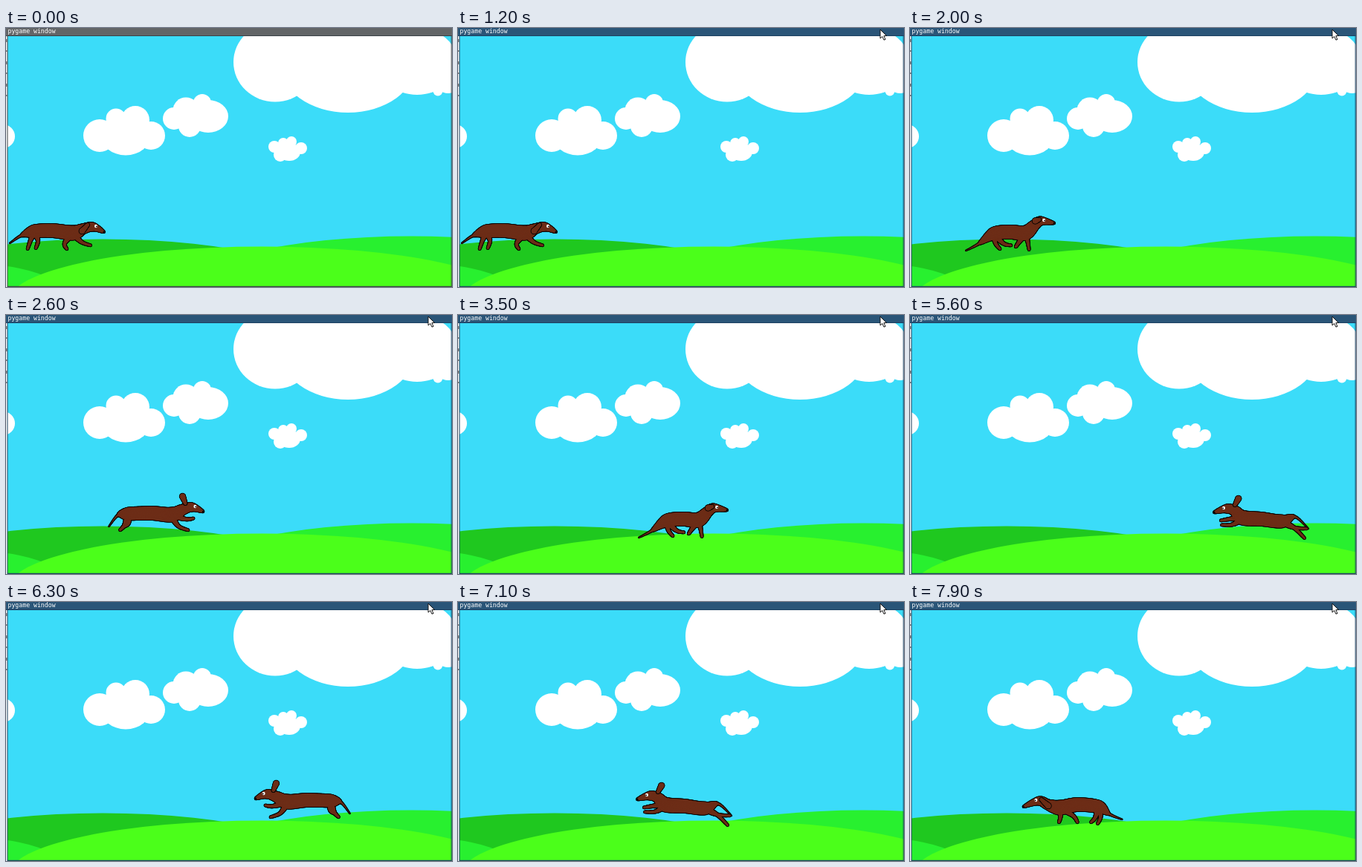
An HTML page with a canvas for the animation above (8 s loop, 600 px wide and 349 px high).

```html
<!DOCTYPE html>
<html lang="en">
<head>
<meta charset="utf-8">
<title>Running dog</title>
<style>
html, body { margin: 0; width: 100%; height: 100%; overflow: hidden; background: #fff; }
canvas { display: block; }
</style>
</head>
<body>
<canvas id="stage" width="600" height="349"></canvas>
<script>
const ctx = document.getElementById('stage').getContext('2d');
const LOOP = 8000, TICK = 100, STEP = 11.2;
const START = 14, TURN = 54;   // ticks: last still one, first one heading back
const FUR = '#6d2d17', INK = '#0c0705';

// Thickness along the body from tail tip to nose, along a leg and along an ear.
const BODY = [0.7, 1.8, 9, 9.5, 10, 7, 6, 1.6];
const LEG = [5, 2.6, 1.8];
const EAR = [2.5, 4.2];
const RUMP = 2, CHEST = 4, HEAD = 6;

const points = text => text.split(' ').map(p => p.split(',').map(Number));

// spine: tail tip to nose; rear, front: knee and paw of two legs; ear: root and tip.
function pose(spine, rear, front, ear) {
  const body = points(spine);
  const legs = (hip, text) => {
    const [k1, p1, k2, p2] = points(text);
    return [[body[hip], k1, p1], [body[hip], k2, p2]];
  };
  return { body, legs: [...legs(RUMP, rear), ...legs(CHEST, front)], ear: points(ear) };
}

const stand = pose('5,290 20,280 38,274 62,273 90,276 103,271 117,268 132,275',
  '43,286 40,297 33,286 29,298', '79,290 82,298 101,288 114,293', '110,265 102,274');
const reach = pose('4,285 16,270 30,268 61,267 88,269 104,262 116,259 131,265',
  '25,283 19,290 30,281 22,286', '107,275 118,274 97,284 111,290', '107,254 103,244');
const gather = pose('8,300 25,291 46,277 68,275 88,276 101,265 109,260 127,263',
  '48,290 54,298 58,290 69,293', '79,289 75,295 91,287 93,299', '107,258 101,260');
const fly = pose('9,288 27,272 45,278 72,275 98,273 108,264 119,261 136,266',
  '28,287 14,301 30,286 11,288', '115,275 127,277 110,282 126,283', '108,256 103,247');
const trot = pose('2,293 19,286 34,276 62,273 86,277 102,273 114,268 135,276',
  '31,289 35,299 38,290 44,297', '68,288 62,297 85,289 87,297', '111,266 101,275');
const cycle = [fly, gather, reach, trot, stand];

// Puffs as centre x, centre y, radius x, radius y (round when left out).
const clouds = [
  '-4,146,16',
  '126,145,22 161,143,34,28.5 148,122,13.5 174,124,19 195,145,19',
  '226,122,15 242,111,17.5 264,101,12 272,119,27,22 247,132,15',
  '361,160,8 373,155,7 384,153,7 397,162,8 381,167,15,12 369,171,9',
  '362,46,56,53.5 460,47,92,67 553,45,54,45 581,85,6.5 595,70,18'
].flatMap(points);

const hills = [
  ['#1fc81f', 130, 367.5, 320, 83],
  ['#28f02f', 545, 352.5, 300, 72],
  ['#28f02f', -40, 393, 150, 75],
  ['#4bff1a', 344, 367.5, 340, 73]
];

function ellipse(color, x, y, rx, ry = rx) {
  ctx.fillStyle = color;
  ctx.beginPath();
  ctx.ellipse(x, y, rx, ry, 0, 0, Math.PI * 2);
  ctx.fill();
}

function rect(x, y, w, h, color) {
  ctx.fillStyle = color;
  ctx.fillRect(x, y, w, h);
}

// Catmull-Rom value between b and c.
const spline = (a, b, c, d, t) =>
  b + t / 2 * (c - a + t * (2 * a - 5 * b + 4 * c - d + t * (3 * (b - c) + d - a)));

// A smooth limb of changing thickness, grown by a margin.
function limb(pts, radii, margin, color) {
  const at = i => pts[Math.max(0, Math.min(pts.length - 1, i))];
  for (let i = 0; i < pts.length - 1; i++) {
    for (let t = 0; t <= 1; t += 0.04) {
      const [x, y] = [0, 1].map(k => spline(at(i - 1)[k], at(i)[k], at(i + 1)[k], at(i + 2)[k], t));
      const r = radii[i] + (radii[i + 1] - radii[i]) * t;
      ellipse(color, x, y, Math.max(0.3, r + margin));
    }
  }
}

function drawPose({ body, legs, ear }) {
  for (const [margin, color] of [[0.5, INK], [-0.6, FUR]]) {
    legs.forEach(leg => limb(leg, LEG, margin, color));
    limb(body, BODY, margin, color);
  }
  limb(ear, EAR, 0.4, INK);
  limb(ear, EAR, -0.6, FUR);
  const [hx, hy] = body[HEAD];
  ellipse('#fff', hx + 4, hy - 1, 2, 2.3);
  ellipse('#000', hx + 4.8, hy - 0.6, 0.9);
  ellipse('#000', ...body[body.length - 1], 1.6);
}

function drawDog(tick) {
  const back = tick >= TURN;
  let p = stand;
  if (back) p = cycle[(tick + 4) % 5];
  else if (tick > START) p = cycle[(tick + 1) % 5];

  ctx.save();
  if (back) {
    ctx.translate(545 - STEP * (tick - 56), 0);
    ctx.scale(-1, 1);
  } else {
    ctx.translate(STEP * Math.max(0, tick - START), 0);
  }
  drawPose(p);
  ctx.restore();
}

function drawScene() {
  rect(2, 11, 598, 338, '#3bdcf9');
  clouds.forEach(puff => ellipse('#fff', ...puff));
  rect(345, 11, 205, 40, '#fff');
  hills.forEach(hill => ellipse(...hill));
}

function drawWindow(active) {
  const bar = active ? '#2a5578' : '#626567';
  const edge = active ? '#1d4263' : '#3c4247';
  rect(0, 0, 2, 349, '#f4f6f7');
  for (let i = 0; i < 6; i++) rect(0, 15 + 15 * i, 1.5, i % 2 ? 2 : 4, '#777');
  rect(0, 0, 600, 11, bar);
  rect(0, 10, 600, 1, edge);
  rect(1.5, 11, 1, 337, edge);
  rect(598.7, 11, 1, 338, edge);
  rect(1.5, 347.8, 598, 1.2, edge);
  ctx.fillStyle = '#fff';
  ctx.font = '8.2px "DejaVu Sans Mono", monospace';
  ctx.fillText('pygame window', 2.5, 7.2);
}

function drawCursor(tick) {
  if (tick < 3) return;
  const left = (1 - Math.min(1, (tick - 2) / 4)) ** 2;
  ctx.save();
  ctx.translate(568 + 36 * left, 2 + 16 * left);
  ctx.beginPath();
  points('0,0 0,12 2.8,9.5 5,14.2 7,13.3 4.9,8.7 8.6,8.5').forEach(p => ctx.lineTo(...p));
  ctx.closePath();
  ctx.fillStyle = '#fff';
  ctx.strokeStyle = '#111';
  ctx.fill();
  ctx.stroke();
  ctx.restore();
}

function draw(now) {
  const tick = Math.floor(now % LOOP / TICK);
  drawScene();
  drawDog(tick);
  drawWindow(tick >= 4);
  drawCursor(tick);
}

let begin;
function loop(now) {
  if (begin === undefined) begin = now;
  draw(now - begin);
  requestAnimationFrame(loop);
}
draw(0);
requestAnimationFrame(loop);
</script>
</body>
</html>
```
